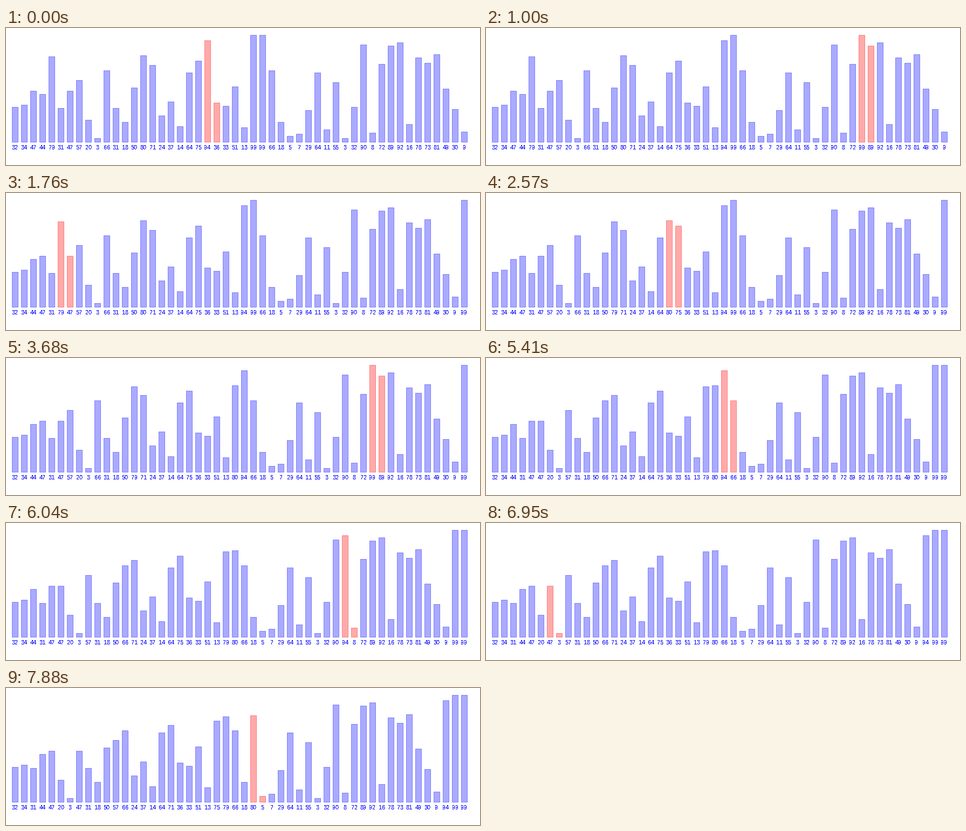
Recreate the animation shown at these times as a matplotlib script. Size 879 by 255 pixels, loop 8000 ms.

```python
import numpy as np
import matplotlib.pyplot as plt
from matplotlib.animation import FuncAnimation
from matplotlib.patches import Rectangle

W, H, DPI = 879, 255, 64
PX = 72 / DPI
LOOP, TICK, STEP = 8000, 20, 137
LEFT, PITCH, BAR = 11, 17, 12
FLOOR, BASELINE, DIGIT = 213, 226, 6
BLUE, RED = ("#aaaaff", "#7f7fff"), ("#ffaaaa", "#ff7f7f")
SWAP_COST, KEEP_COST = 60, 20

# The bars as they stand when the loop opens, halfway through the first pass
VALUES = [32, 34, 47, 44, 79, 31, 47, 57, 20, 3, 66, 31, 18, 50, 80, 71, 24,
          37, 14, 64, 75, 94, 36, 33, 51, 13, 99, 99, 66, 18, 5, 7, 29, 64,
          11, 55, 3, 32, 90, 8, 72, 89, 92, 16, 78, 73, 81, 49, 30, 9]
FIRST = VALUES.index(94)

# (ms, comparisons made so far)
PACE = [(0, 0), (1000, 19), (2570, 47), (3680, 67), (4730, 89), (6040, 112),
        (7880, 149)]


def bubble_sort(values, first):
    """Yield (index, list before the comparison, cost of the comparison)."""
    a = list(values)
    for last in range(len(a) - 1, 0, -1):
        for j in range(first, last):
            swap = a[j] > a[j + 1]
            yield j, a[:], SWAP_COST if swap else KEEP_COST
            if swap:
                a[j], a[j + 1] = a[j + 1], a[j]
        first = 0


def build_steps():
    """Sample the sort in steps of roughly equal length; swaps take longer."""
    states = list(bubble_sort(VALUES, FIRST))
    work = np.cumsum([0] + [s[2] for s in states[:-1]])
    times, counts = zip(*PACE)
    starts = [np.linspace(a, b, round((b - a) / STEP), endpoint=False)
              for a, b in zip(times, times[1:])]
    starts = np.append(np.concatenate(starts), times[-1])
    done = np.interp(starts, times, work[list(counts)])
    return starts, [states[np.abs(work - d).argmin()] for d in done]


starts, steps = build_steps()

plt.rcParams.update({"font.family": "Liberation Sans", "toolbar": "None",
                     "text.hinting": "native", "text.hinting_factor": 1})
fig = plt.figure(figsize=(W / DPI, H / DPI), dpi=DPI, facecolor="white")
ax = fig.add_axes([0, 0, 1, 1])
ax.set(xlim=(0, W), ylim=(H, 0))
ax.axis("off")

bars, labels = [], []
for i in range(len(VALUES)):
    x = LEFT + PITCH * i
    bars.append(ax.add_patch(Rectangle((x + 0.5, 0), BAR - 1, 0, lw=PX,
                                       snap=False)))
    labels.append(ax.text(x, BASELINE, "", size=11 * PX, color="#0000ff",
                          ha="left", va="baseline", antialiased=False))


def update(k):
    now = (k + 0.5) * TICK
    j, values, _ = steps[np.searchsorted(starts, now, side="right") - 1]
    for i, (v, bar, label) in enumerate(zip(values, bars, labels)):
        face, edge = RED if i in (j, j + 1) else BLUE
        bar.set(y=FLOOR - 2 * v - 1.5, height=2 * v + 1,
                facecolor=face, edgecolor=edge)
        text = str(v)
        label.set_text(text)
        label.set_x(LEFT + PITCH * i + (BAR - DIGIT * len(text)) / 2)
    return bars + labels


anim = FuncAnimation(fig, update, frames=LOOP // TICK, interval=TICK,
                     init_func=lambda: update(0), repeat=True, repeat_delay=0)
plt.show()
```
